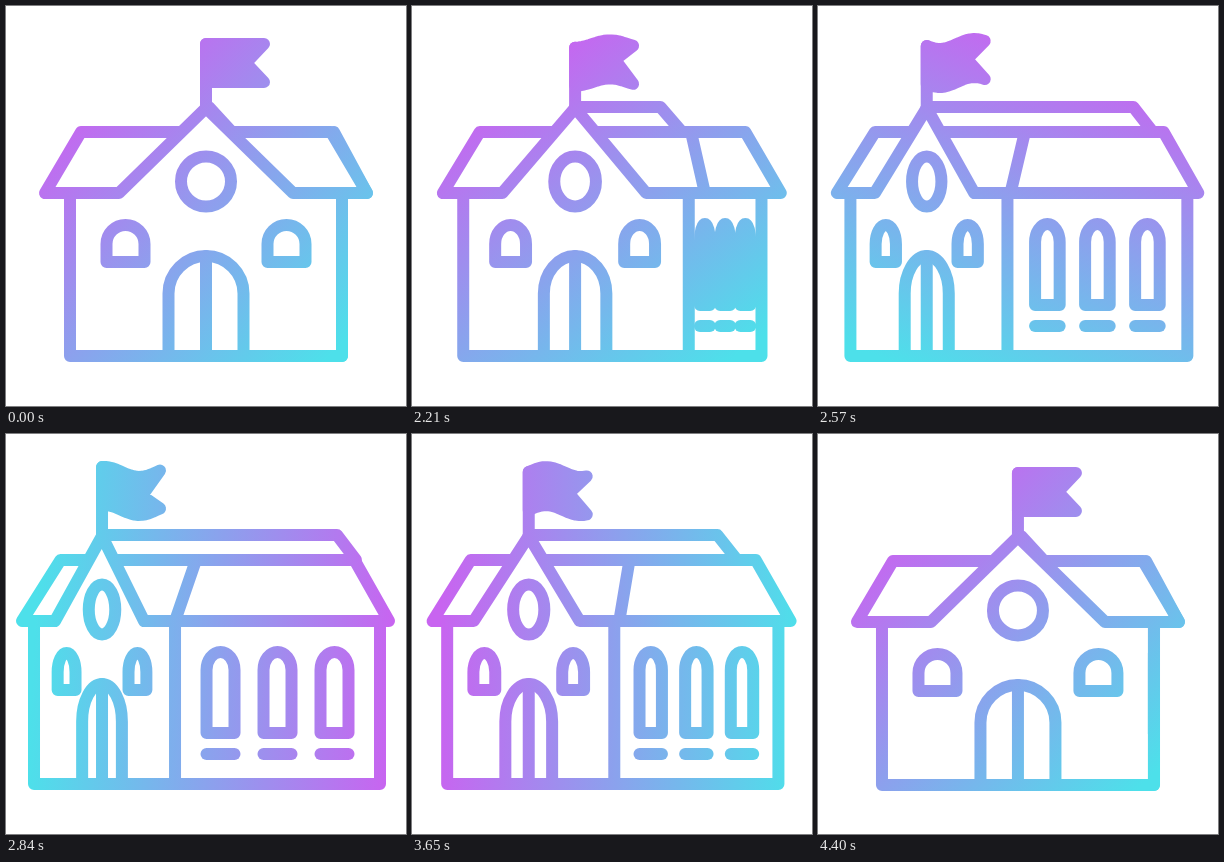
Animation of 400 by 400 pixels, one loop 4430 ms. Source, as an HTML page with a canvas:

```html
<!DOCTYPE html>
<html lang="en">
<head>
<meta charset="utf-8">
<title>School building</title>
<style>
  html, body { margin: 0; width: 100%; height: 100%; overflow: hidden; background: #fff; }
  canvas { display: block; width: 400px; height: 400px; }
</style>
</head>
<body>
<canvas id="stage" width="400" height="400"></canvas>
<script>
const ctx = document.getElementById('stage').getContext('2d');
const LOOP = 4430, START = 2000;
const clamp = x => Math.min(1, Math.max(0, x));
const smooth = x => (x = clamp(x), x * x * (3 - 2 * x));

// Cubic bezier easing with control points (a, 0) and (b, 1).
function ease(x, a, b) {
  x = clamp(x);
  let lo = 0, hi = 1;
  for (let i = 0; i < 24; i++) {
    const s = (lo + hi) / 2, r = 1 - s;
    if (3 * r * r * s * a + 3 * r * s * s * b + s * s * s < x) lo = s; else hi = s;
  }
  return smooth(lo);
}

function line(...points) {
  ctx.beginPath();
  points.forEach(([x, y]) => ctx.lineTo(x, y));
  ctx.stroke();
}

function arch(x, halfWidth, top, rise, bottom) {
  ctx.beginPath();
  ctx.moveTo(x - halfWidth, bottom);
  ctx.lineTo(x - halfWidth, top + rise);
  ctx.ellipse(x, top + rise, halfWidth, rise, 0, Math.PI, 2 * Math.PI);
  ctx.lineTo(x + halfWidth, bottom);
  ctx.closePath();
  ctx.stroke();
}

function setGradient(angle) {
  const dx = 180 * Math.cos(angle), dy = 180 * Math.sin(angle);
  const paint = ctx.createLinearGradient(208 - dx, 212 - dy, 208 + dx, 212 + dy);
  paint.addColorStop(0, '#c864f0');
  paint.addColorStop(1, '#4de0ea');
  ctx.strokeStyle = ctx.fillStyle = paint;
}

function drawFlag(x, t) {
  const amp = 5 * smooth(Math.min((t - START) / 320, (4300 - t) / 350));
  const run = clamp((t - 2360) / 1560);
  const phase = -Math.PI * 2 * (run + smooth(run));
  const wave = u => amp * Math.cos(phase + u * Math.PI * 5 / 3);
  const at = (u, y) => [x + 58 * u, y + wave(u)];
  const steps = Array.from({ length: 17 }, (_, i) => i / 16);
  line([x, 38 + wave(0)], [x, 102]);
  ctx.beginPath();
  [...steps.map(u => at(u, 38)), at(0.69, 57), ...steps.reverse().map(u => at(u, 76))]
    .forEach(([px, py]) => ctx.lineTo(px, py));
  ctx.closePath();
  ctx.fill();
  ctx.stroke();
}

// p is how far the building has turned: 0 is the front view.
function drawHouse(p) {
  const centre = 200 - 104 * p;
  const left = 64 - 36 * p, corner = 336 - 167 * p, right = 336 + 38 * p;
  const footL = 113 - 64 * p, footR = 287 - 149 * p;
  const onGable = foot => centre + (foot - centre) * 24 / 85;

  // Walls
  line([left, 187], [left, 350], [right, 350], [right, 187]);
  line([corner, 187], [corner, 350]);

  // Roof
  line([onGable(footL), 126], [75 - 20.5 * p, 126], [39 - 23 * p, 187],
    [footL, 187], [centre, 102], [footR, 187],
    [361 + 22 * p, 187], [325 + 23.5 * p, 126], [onGable(footR), 126]);
  line([361 - 192 * p, 187], [328 - 138 * p, 126]);
  line([centre, 101], [203 + 128 * p, 101], [226 + 124 * p, 126]);

  // Front
  ctx.beginPath();
  ctx.ellipse(centre, 175.5, 25 * (1 - 0.47 * p), 25, 0, 0, 2 * Math.PI);
  ctx.stroke();
  for (const side of [-1, 1])
    arch(centre + side * 80.5 * (1 - 0.56 * p), 19 * (1 - 0.53 * p), 219, 19, 256);
  arch(centre, 37.5 * (1 - 0.47 * p), 250, 37.5, 350);
  line([centre, 250], [centre, 350]);

  // Side
  const half = 14 * p;
  for (const i of [-1, 0, 1]) {
    const x = (corner + right) / 2 + i * 57 * p;
    arch(x, half, 218, 18, 299);
    line([x - half, 320], [x + half, 320]);
  }
}

function draw(t) {
  const turn = 1.02 * (ease((t - START) / 1033, 0.2, 0.193) - ease((t - 3230) / 1200, 0.58, 0.363));
  const spin = ease((t - START) / (LOOP - START), 0.35, 0.4);
  ctx.setTransform(1, 0, 0, 1, 0, 0);
  ctx.fillStyle = '#fff';
  ctx.fillRect(0, 0, 400, 400);
  ctx.translate(0, 0.9 * clamp((t - 3600) / 400));
  ctx.lineWidth = 12;
  ctx.lineCap = ctx.lineJoin = 'round';
  setGradient(Math.PI / 4 + 2 * Math.PI * spin);
  drawHouse(turn);
  drawFlag(200 - 104 * turn, t);
}

const begin = performance.now();
function tick() {
  draw((performance.now() - begin) % LOOP);
  requestAnimationFrame(tick);
}
tick();
</script>
</body>
</html>
```
